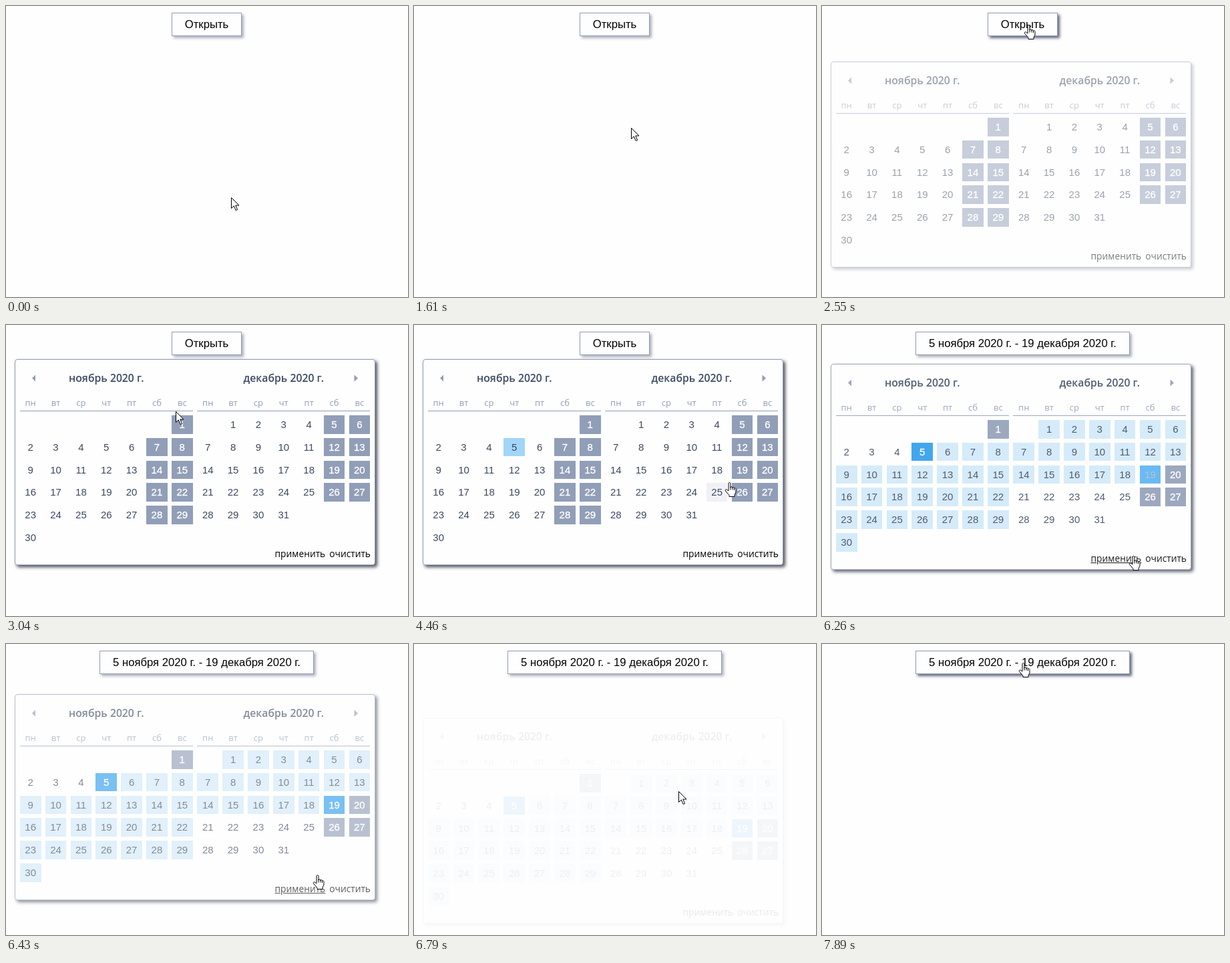
Animation of 602 by 435 pixels, one loop 8 s. Source, as an HTML page:

```html
<!DOCTYPE html>
<html lang="ru">
<head>
<meta charset="utf-8">
<title>Выбор дат</title>
<style>
  html, body { margin: 0; width: 100%; height: 100%; overflow: hidden; background: #fefefe; }
  #stage { position: relative; width: 602px; height: 435px; overflow: hidden; cursor: none; }
  #stage * { box-sizing: border-box; }
  #bar { position: absolute; left: 0; top: 10px; width: 601px; display: flex; justify-content: center; }
  #button {
    height: 35px; padding: 0 19px; border: 1px solid #919eb7; background: #fefefe;
    font: 16.7px/33px "Liberation Sans", sans-serif; color: #000; white-space: nowrap;
  }
  #panel { position: absolute; inset: 0; }
  #panel div, #panel svg { position: absolute; }
  #panel #frame { left: 13px; top: 51px; width: 540px; height: 308px; border: 1px solid #919eb7; border-radius: 4px; background: #fefefe; }
  .title { top: 69px; width: 259px; text-align: center; font: 600 15.75px/20px "Open Sans", sans-serif; color: #3b4a63; }
  .weekday { top: 106px; width: 31.7px; text-align: center; font: 13px/20px "Open Sans", sans-serif; color: #919eb7; }
  .rule { top: 128px; width: 259px; height: 1px; background: #919eb7; }
  .day { width: 31.7px; height: 27.5px; text-align: center; font: 15px/28px "Liberation Sans", sans-serif; }
  #links { top: 332px; right: 56px; display: flex; gap: 6px; font: 13.8px/20px "Open Sans", sans-serif; color: #000; }
  #pointer { position: absolute; left: 0; top: 0; overflow: visible; }
  #pointer path { fill: #fff; stroke: #000; stroke-width: 1; }
</style>
</head>
<body>
<div id="stage">
  <div id="bar"><div id="button">Открыть</div></div>
  <div id="panel">
    <div id="frame"></div>
    <svg width="602" height="100" fill="#919eb7"><path d="M44 74.5V84.5L39 79.5ZM521.5 74.5V84.5L527 79.5Z"/></svg>
    <div id="links"><span id="apply">применить</span><span>очистить</span></div>
  </div>
  <svg id="pointer" width="20" height="24">
    <path id="arrow" d="M.5 .5V16.5L4.3 12.9 7.2 19.5 9.6 18.5 6.8 12H12Z"/>
    <g id="hand" transform="translate(-5.5 0)">
      <path d="M5.5 13V2C5.5 0 8.5 0 8.5 2V8C8.5 6.3 11.5 6.3 11.5 8.5C11.5 7 14 7 14 9.5C14 8.3 16.5 8.3 16.5 10.5V15L14.5 19V21.5H6.5V19.5L1 13C0 11 2 10 3.5 11.5Z"/>
      <path d="M8.5 7V11.5M11.5 8V11.5M14 9.5V12" style="fill:none"/>
    </g>
  </svg>
</div>
<script>
const LOOP = 8000;
const CLICK_START = 3780, CLICK_END = 4990, BLUR = 6080;
const OPEN = 2225, CLOSE = 6190, SLIDE = 650, DROP = 64;
const COLUMN = 37.85, ROW = 33.8;
const RANGE_TEXT = '5 ноября 2020 г. - 19 декабря 2020 г.';

const SLATE = [145, 158, 183], PAPER = [254, 254, 254], WHITE = [255, 255, 255], INK = [59, 72, 96];
const HOVER = [236, 237, 242], SKY = [208, 233, 249], FOCUS = [161, 214, 249], CHOSEN = [44, 156, 238];

// Pointer hot spot: time, x, y
const PATH = [
  [0, 337, 286], [1340, 337, 286], [2010, 308, 28], [2700, 308, 28],
  [3040, 254, 129], [3700, 150, 180], [3900, 150, 180], [4330, 455, 241],
  [4460, 471, 235], [4590, 480, 231], [4820, 498, 219], [5460, 498, 219],
  [5640, 495, 387], [5710, 495, 389], [5800, 493, 394], [6080, 465, 345],
  [6470, 465, 345], [7120, 325, 92], [7500, 303, 28], [7810, 303, 28], [7890, 300, 28]
];

const $ = id => document.getElementById(id);
const panel = $('panel'), frame = $('frame'), button = $('button');
const clamp = v => Math.min(1, Math.max(0, v));
const ramp = (t, start, length = 290) => clamp((t - start) / length);
const mix = (a, b, p) => a.map((v, i) => v + (b[i] - v) * p);
const rgb = c => `rgb(${c.map(Math.round)})`;
const inBox = ([x, y], l, t, w, h) => x >= l && x < l + w && y >= t && y < t + h;

function add(className, text, left) {
  const el = document.createElement('div');
  el.className = className;
  el.textContent = text;
  el.style.left = left + 'px';
  panel.append(el);
  return el;
}

const cells = [];
function buildMonth(name, left, firstColumn, length, month) {
  add('title', name, left);
  add('rule', '', Math.round(left));
  ['пн', 'вт', 'ср', 'чт', 'пт', 'сб', 'вс'].forEach((d, i) => add('weekday', d, left + COLUMN * i));
  for (let day = 1; day <= length; day++) {
    const slot = day - 1 + firstColumn, column = slot % 7;
    const x = left + COLUMN * column, y = 135 + ROW * Math.floor(slot / 7);
    const el = add('day', day, x);
    el.style.top = y + 'px';
    const order = month * 30 + day;
    cells.push({
      el, x, y, weekend: column > 4,
      first: order === 5, last: order === 49, inRange: order > 5 && order < 49
    });
  }
}
buildMonth('ноябрь 2020 г.', 20.85, 6, 30, 0);
buildMonth('декабрь 2020 г.', 286.4, 1, 31, 1);

function pointerAt(t) {
  const i = PATH.findIndex(p => p[0] > t);
  if (i < 1) return PATH[i < 0 ? PATH.length - 1 : 0].slice(1);
  const [t0, ...a] = PATH[i - 1], [t1, ...b] = PATH[i];
  return mix(a, b, (t - t0) / (t1 - t0));
}

const onButton = (p, t) => t > CLOSE ? inBox(p, 140, 10, 321, 35) : inBox(p, 248, 10, 105, 35);
const isOpen = t => t > OPEN + SLIDE / 2 && t < CLOSE + SLIDE / 2;
const onPanel = (p, t) => isOpen(t) && inBox(p, 13, 51, 540, 308);
const onDay = (p, t, c, pad = 0) =>
  isOpen(t) && t < BLUR && inBox(p, c.x - pad, c.y - pad, 32 + 2 * pad, 28 + 2 * pad);

// Recent pointer samples turn hover states into short linear fades.
function recent(t) {
  return Array.from({ length: 8 }, (_, i) => {
    const at = Math.max(0, t - i * 20);
    return { at, point: pointerAt(at) };
  });
}

function paintDay(c, t, trail) {
  let bg = c.weekend ? SLATE : PAPER, fg = c.weekend ? WHITE : INK;
  const blend = (nextBg, nextFg, p) => { bg = mix(bg, nextBg, p); fg = mix(fg, nextFg, p); };
  const hover = trail.filter(s => onDay(s.point, s.at, c)).length / trail.length;
  if (hover) blend(HOVER, INK, hover);
  if (c.inRange) blend(SKY, INK, ramp(t, CLICK_END));
  if (c.first || c.last) {
    blend(FOCUS, INK, ramp(t, c.first ? CLICK_START : CLICK_END));
    blend(CHOSEN, WHITE, ramp(t, c.first ? CLICK_END : BLUR));
  }
  c.el.style.background = rgb(bg);
  c.el.style.color = rgb(fg);
  // Light digits render slightly heavier than dark ones.
  c.el.style.webkitTextStroke = fg[0] > 200 ? '.35px' : '0';
}

function render(t) {
  const point = pointerAt(t), trail = recent(t);
  const share = test => trail.filter(s => test(s.point, s.at)).length / trail.length;

  const label = t < CLOSE ? 'Открыть' : RANGE_TEXT;
  if (button.textContent !== label) button.textContent = label;
  button.style.boxShadow = `3px 3px 4px rgba(62,72,98,${.42 + .4 * share(onButton)})`;

  const shown = ramp(t, OPEN, SLIDE) - ramp(t, CLOSE, SLIDE);
  panel.style.visibility = shown > 0 ? 'visible' : 'hidden';
  panel.style.opacity = shown;
  panel.style.transform = `translateY(${Math.round(DROP * (1 - shown))}px)`;
  const lift = share(onPanel);
  frame.style.boxShadow = `3px 3px ${4 + lift}px rgba(45,50,65,${.45 + .4 * lift})`;
  if (shown > 0) cells.forEach(c => paintDay(c, t, trail));

  const onApply = t > 6000 && t < 6500 && inBox(point, 402, 332, 76, 26);
  $('apply').style.textDecoration = onApply ? 'underline' : 'none';

  const hand = onApply || onButton(point, t) || cells.some(c => onDay(point, t, c, 3));
  $('hand').style.display = hand ? '' : 'none';
  $('arrow').style.display = hand ? 'none' : '';
  $('pointer').style.transform = `translate(${point.map(v => Math.round(v) + 'px')})`;
}

const begin = performance.now();
function tick() {
  render((performance.now() - begin) % LOOP);
  requestAnimationFrame(tick);
}
tick();
</script>
</body>
</html>
```
